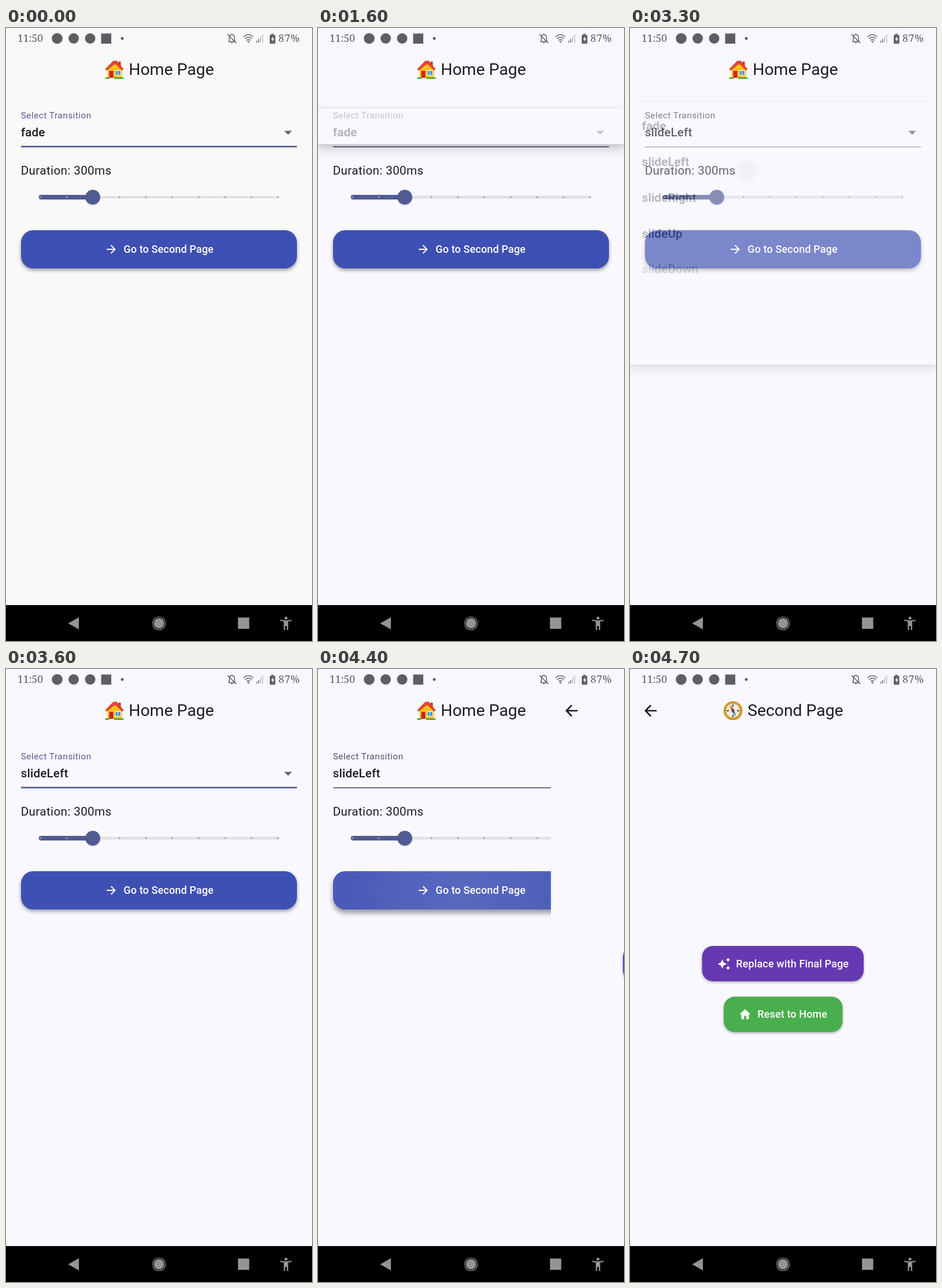
An HTML page for the animation above (6300 ms loop, 529 by 1058 pixels).

```html
<!DOCTYPE html>
<html lang="en">
<head>
<meta charset="utf-8">
<title>Page transitions</title>
<style>
html, body { margin: 0; width: 100%; height: 100%; overflow: hidden; background: #f9f8fe; }
svg { display: block; width: 100%; height: 100%; }
text { font-family: Roboto, sans-serif; fill: #1b1b21; white-space: pre; }
.status text { font-family: "Noto Serif", serif; font-size: 17.5px; fill: #5f5e62; }
.title { font-size: 28.3px; }
.label { font-size: 15.4px; letter-spacing: .48px; }
.body { font-size: 20.6px; letter-spacing: .39px; }
.item { font-size: 20.6px; font-weight: 500; letter-spacing: .19px; }
.btn text { font-size: 18px; font-weight: 500; letter-spacing: .13px; fill: #fff; }
.btn > rect { filter: drop-shadow(0 2px 2px rgba(0,0,0,.3)); }
#go > rect:first-child { filter: drop-shadow(0 3px 3px rgba(0,0,0,.38)); }
#go.pressed > rect:first-child { filter: drop-shadow(0 6px 5px rgba(0,0,0,.4)); }
#sheet {
  filter: drop-shadow(0 2.5px 4.4px rgba(0,0,0,.2))
    drop-shadow(0 11px 8px rgba(0,0,0,.14))
    drop-shadow(0 5px 11px rgba(0,0,0,.1));
}
</style>
</head>
<body>
<svg viewBox="0 0 529 1058">
  <defs>
    <clipPath id="goClip"><rect x="26" y="349" width="477" height="66" rx="21"/></clipPath>
    <radialGradient id="glow">
      <stop offset="0" stop-color="#fff" stop-opacity=".17"/>
      <stop offset=".6" stop-color="#fff" stop-opacity=".1"/>
      <stop offset="1" stop-color="#fff" stop-opacity="0"/>
    </radialGradient>
    <radialGradient id="smudge">
      <stop offset=".4" stop-color="#000" stop-opacity=".09"/>
      <stop offset="1" stop-color="#000" stop-opacity="0"/>
    </radialGradient>
  </defs>

  <g id="home">
    <rect id="bg" width="529" height="996"/>
    <g transform="translate(187.5 72)">
      <path d="M7-14h4v9h-4z" fill="#a8452c"/>
      <path d="M-12 0L1-12 13 0v14h-25z" fill="#fcc21b"/>
      <path d="M-16-1L-2-15.500h6L16-1l-2.500 2.500L1-10-13.500 1.500z" fill="#e2452f"/>
      <path d="M-9 2h7v12h-7z" fill="#c62828"/>
      <path d="M1 1h10v9H1z" fill="#fff"/>
      <path d="M2 2h3.500v7H2zM6.500 2H10v7H6.500z" fill="#3f8fd2"/>
      <path d="M-16 13h6l2 3h-8zM-1 13h17v3H-1z" fill="#6ba83a"/>
    </g>
    <text class="title" x="212.3" y="81">Home Page</text>

    <text id="label" class="label" x="25.7" y="156">Select Transition</text>
    <text id="value" class="item" x="25.7" y="187"></text>
    <path d="M481 177.5h13.5l-6.75 6.8z" fill="#66656c"/>
    <rect id="line" x="26" width="477"/>

    <text class="body" x="25.7" y="253">Duration: 300ms</text>
    <rect id="track" x="150" width="323" rx="2.5" fill="#e2e0e7"/>
    <rect x="56.5" y="288" width="100" height="8" rx="4" fill="#505b92"/>
    <g id="ticks"></g>
    <circle cx="150" cy="292" r="12.8" fill="#505b92" style="filter:drop-shadow(0 1px 1px rgba(0,0,0,.25))"/>

    <g id="go" class="btn">
      <rect x="26" y="349" width="477" height="66" rx="21" fill="#3e50b3"/>
      <g clip-path="url(#goClip)">
        <rect id="tint" x="26" y="349" width="477" height="66" fill="#fff"/>
        <circle id="splash" cx="250" cy="379" fill="url(#glow)"/>
      </g>
      <path d="M174 382h14M181.5 375l7 7-7 7" fill="none" stroke="#fff" stroke-width="2"/>
      <text x="203.3" y="388">Go to Second Page</text>
    </g>
  </g>

  <g id="menu">
    <rect id="sheet" width="529" rx="2.6" fill="#f9f8fe"/>
    <circle id="touch" cx="203" cy="246" r="24" fill="url(#smudge)"/>
    <g id="items"></g>
  </g>

  <g id="second">
    <rect width="529" height="996" fill="#f9f8fe"/>
    <path d="M46 72H28M36 62.5L26.8 72l9.2 9.5" fill="none" stroke="#1b1b21" stroke-width="2.6"/>
    <g transform="translate(178 72)">
      <circle r="14.5" fill="#f3ecd2" stroke="#e0a01e" stroke-width="3.2"/>
      <circle r="15.9" fill="none" stroke="#b97a12" stroke-width=".8"/>
      <circle r="12.6" fill="none" stroke="#8b6a25" stroke-width=".8"/>
      <path d="M0-11v4M0 11V7M-11 0h4M11 0H7" stroke="#444" stroke-width="2"/>
      <path d="M-5-10L2.4-1.2-2.4 1.2z" fill="#dd3a35"/>
      <path d="M5 10L2.4-1.2-2.4 1.2z" fill="#3c7fa3"/>
      <circle r="1.6" fill="#333"/>
    </g>
    <text class="title" x="203.2" y="81">Second Page</text>
    <g class="btn">
      <rect x="124.5" y="478" width="279.5" height="61" rx="19" fill="#6439b2"/>
      <path d="M159.5 501l2.5 5.5 5.5 2.5-5.5 2.5-2.5 5.5-2.5-5.5-5.5-2.5 5.5-2.5zM169.5 498l1.2 2.8 2.8 1.2-2.8 1.2-1.2 2.8-1.2-2.8-2.8-1.2 2.8-1.2zM169.5 512l1.2 2.8 2.8 1.2-2.8 1.2-1.2 2.8-1.2-2.8-2.8-1.2 2.8-1.2z" fill="#fff"/>
      <text x="183.3" y="515">Replace with Final Page</text>
    </g>
    <g class="btn">
      <rect x="162" y="565.5" width="205.5" height="61" rx="19" fill="#49ae4d"/>
      <path d="M199 587l-9.5 9h3v8.5h4.8v-6h3.4v6h4.8V596h3z" fill="#fff"/>
      <text x="220.3" y="602">Reset to Home</text>
    </g>
  </g>

  <g class="status" fill="#5f5e62">
    <text x="20" y="24">11:50</text>
    <circle cx="88.5" cy="18" r="9.3"/>
    <circle cx="117" cy="18" r="9"/>
    <circle cx="145.5" cy="18" r="9"/>
    <rect x="164.5" y="9.5" width="17.5" height="17.5"/>
    <circle cx="201" cy="18" r="2.5"/>
    <g fill="none" stroke="#5f5e62" stroke-width="1.5">
      <path d="M383 11l15 15M384 23.5h13M386 23v-6q0-5 4.5-6 4.5 1 4.5 6v6M389 25.5h3"/>
      <path d="M410.5 15.5q8.5-8 17 0M413 18.5q6-5.5 12 0M415.5 21.5q3.5-3 7 0" stroke-width="1.4"/>
      <path d="M433.5 25v-3M436.8 25v-6"/>
      <path d="M440.2 25V15M443.6 25V11" stroke="#b9b8bd"/>
    </g>
    <circle cx="419" cy="23.8" r="1.5"/>
    <path d="M458.5 10h4v2h3v15h-9.5V12h2.5z"/>
    <path d="M461.5 14l-3 6h2v4l3-6h-2z" fill="#fff"/>
    <text x="471" y="24" letter-spacing=".6">87%</text>
  </g>

  <rect y="996" width="529" height="62"/>
  <g fill="#949494">
    <path d="M107.5 1027.5L126 1017v21z"/>
    <circle cx="264.5" cy="1027.5" r="9"/>
    <circle cx="264.5" cy="1027.5" r="11" fill="none" stroke="#949494" stroke-width="1.2"/>
    <rect x="401" y="1017.5" width="19.5" height="19.5"/>
    <circle cx="484" cy="1018.5" r="2.5"/>
    <path d="M474.5 1021q9.5 3 19 0l.5 2.2-6.2 1.3V1039h-2.3v-7h-3v7h-2.3v-14.5L474 1023.2z"/>
  </g>
</svg>
<script>
const LOOP = 6300, STEP = 100;
const names = ["fade", "slideLeft", "slideRight", "slideUp", "slideDown", "scale", "rotate"];
const $ = id => document.getElementById(id);
const clamp = x => Math.min(1, Math.max(0, x));
const span = (t, from, to) => clamp((t - from) / (to - from));
const lerp = (a, b, k) => a + (b - a) * k;
const mix = (a, b, k) => `rgb(${a.map((v, i) => lerp(v, b[i], k))})`;

function add(parent, tag, attrs) {
  const el = document.createElementNS("http://www.w3.org/2000/svg", tag);
  set(el, attrs);
  return parent.appendChild(el);
}

function set(el, attrs) {
  for (const key in attrs) el.setAttribute(key, attrs[key]);
}

for (let i = 0; i < 10; i++)
  add($("ticks"), "circle", { cx: 59.3 + i * 45.63, cy: 292, r: 1.4, fill: i < 2 ? "#a9add0" : "#9c9ba8" });

const items = names.map((name, i) => {
  const el = add($("items"), "text", { class: "item", x: 20.6, y: 176.3 + i * 61.75 });
  el.textContent = name;
  return el;
});

// cubic-bezier(.42, 0, .58, 1)
function easeInOut(x) {
  let lo = 0, hi = 1;
  for (let i = 0; i < 20; i++) {
    const s = (lo + hi) / 2, r = 1 - s;
    if (1.26 * r * r * s + 1.74 * r * s * s + s ** 3 < x) lo = s; else hi = s;
  }
  return lo * lo * (3 - 2 * lo);
}

function drawMenu(t) {
  const closing = t >= 3300;
  const open = closing ? 1 - span(t, 3249.5, 3549.5) : span(t, 1550, 1850);
  const alpha = closing ? span(open, .75, 1) : span(open, 0, .25);
  const size = closing ? 1 : span(open, .25, .5);
  const top = lerp(139, 128.5, size);
  set($("menu"), { opacity: alpha, display: alpha ? "inline" : "none" });
  set($("sheet"), { y: top, height: lerp(200.5, 581, size) - top });
  set($("touch"), { opacity: closing ? 1 : 0 });
  const unit = .5 / (names.length + 1.5);
  items.forEach((el, i) => {
    const start = .5 + (i + 1) * unit;
    set(el, { opacity: span(open, start, start + 1.5 * unit) });
  });
}

function drawHome(t) {
  const focus = t < 3300 ? 1 - span(t, 1500, 1700)
    : t < 4300 ? span(t, 3300, 3500) : 1 - span(t, 4300, 4480);
  const early = t < 1600;
  set($("bg"), { fill: early ? "#f9f9fa" : "#f9f8fe" });
  $("value").textContent = names[t < 3300 ? 0 : 1];
  $("label").style.fill = mix([70, 70, 79], [92, 89, 147], focus);
  const height = lerp(1.3, 2.6, focus);
  set($("line"), { y: 206 - height, height, fill: mix([119, 118, 128], [80, 88, 146], focus) });
  set($("track"), { y: early ? 290 : 289.5, height: early ? 4 : 5 });

  const pressed = t >= 4300, press = span(t, 4300, 4500);
  $("go").classList.toggle("pressed", pressed && t < 4500);
  set($("tint"), { opacity: pressed ? lerp(.03, .09, press) : 0 });
  set($("splash"), { r: pressed ? lerp(70, 310, press) : 0, opacity: 1 - press });
}

function draw(now) {
  const t = Math.floor(now % LOOP / STEP) * STEP;
  drawHome(t);
  drawMenu(t);
  const slide = easeInOut(span(t, 4298.5, 4598.5));
  set($("second"), { transform: `translate(${529 * (1 - slide)} 0)`, display: slide ? "inline" : "none" });
}

const began = performance.now();
function tick() {
  draw(performance.now() - began);
  requestAnimationFrame(tick);
}
tick();
</script>
</body>
</html>
```
